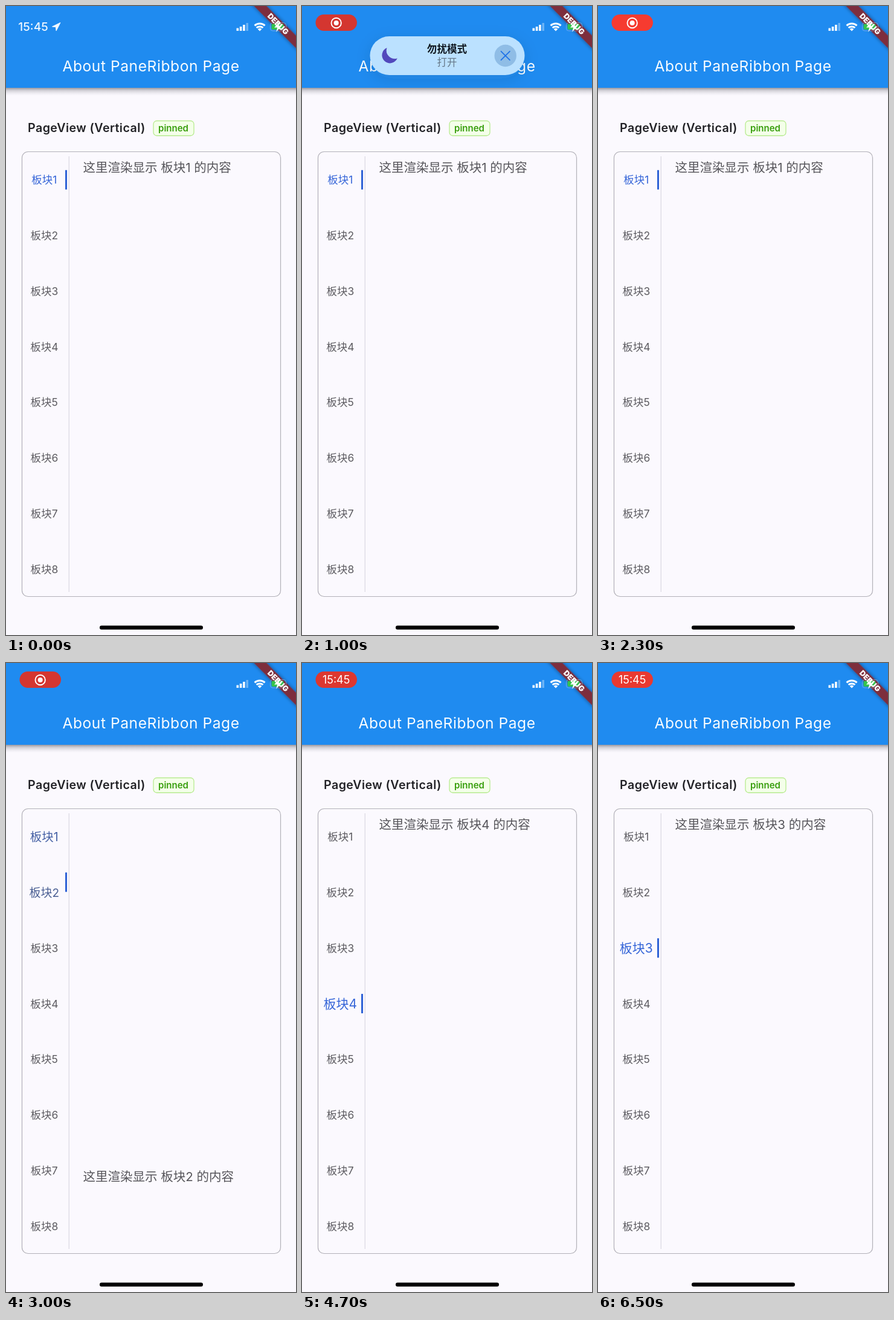
Write an HTML page that moves like this. It is 480 by 1038 pixels and loops after 6.6 s.

```html
<!DOCTYPE html>
<html lang="zh-CN">
<head>
<meta charset="utf-8">
<title>Vertical tabs</title>
<style>
  html, body { margin: 0; width: 100%; height: 100%; overflow: hidden; background: #fbf9fe; }
  svg { display: block; width: 480px; height: 1038px; font-family: Inter, "Noto Sans CJK SC", "Noto Sans CJK", sans-serif; }
  .mid { text-anchor: middle; }
  .tab { font-size: 17.5px; }
  .page { font-size: 20.5px; fill: #56555a; }
</style>
</head>
<body>
<svg viewBox="0 0 480 1038">
  <defs>
    <linearGradient id="fade" x2="0" y2="1">
      <stop stop-color="#6f6e78" stop-opacity=".7"/>
      <stop offset=".35" stop-color="#908f98" stop-opacity=".38"/>
      <stop offset="1" stop-color="#c8c6d0" stop-opacity="0"/>
    </linearGradient>
    <filter id="soft" x="-20%" y="-60%" width="140%" height="260%">
      <feDropShadow dx="0" dy="6" stdDeviation="12" flood-color="#333" flood-opacity=".12"/>
    </filter>
    <filter id="edge" x="-10%" y="-60%" width="120%" height="220%">
      <feDropShadow dx="0" dy="0" stdDeviation="3" flood-opacity=".45"/>
    </filter>
    <clipPath id="view"><rect x="105" y="248" width="349" height="719"/></clipPath>
  </defs>

  <rect width="480" height="1038" fill="#fbf9fe"/>
  <rect y="135" width="480" height="13" fill="url(#fade)"/>
  <rect width="480" height="135" fill="#1f8bf0"/>
  <text class="mid" x="240" y="108" font-size="24.6" letter-spacing=".55" fill="#f8fcff">About PaneRibbon Page</text>

  <text x="36" y="208" font-size="19.7" font-weight="600" letter-spacing=".4" fill="#222226">PageView (Vertical)</text>
  <rect x="244" y="189.5" width="67" height="24.5" rx="5.5" fill="#f4ffe9" stroke="#b7eb8f" stroke-width="1.3"/>
  <text class="mid" x="277" y="206.5" font-size="15" font-weight="600" fill="#389e0d">pinned</text>

  <rect x="26.5" y="240.5" width="428" height="734" rx="10" fill="none" stroke="#b2b1b8" stroke-width="1.2"/>
  <path d="M104.3 248V967" stroke="#dcdae4" stroke-width="1.3"/>
  <g id="tabs"></g>
  <rect id="bar" x="98" width="3" height="32" fill="#2f62d6"/>
  <g clip-path="url(#view)"><g id="pages"></g></g>
  <rect x="155" y="1022.5" width="171" height="6.5" rx="3.2"/>

  <g transform="translate(480 0) rotate(45)">
    <rect x="-60" y="34.5" width="120" height="14.7" fill="#7d2d3e" filter="url(#edge)"/>
  </g>
  <g fill="#f8fcff">
    <path d="M381.5 36.5h3.6v4.5h-3.6zM386.8 34h3.6v7h-3.6zM392.1 31h3.6v10h-3.6z"/>
    <path d="M397.4 28h3.6v13h-3.6z" opacity=".35"/>
    <g fill="none" stroke="#f8fcff" stroke-width="3">
      <path d="M411.5 32.3a12.5 12.5 0 0 1 17 0M414.6 36a8 8 0 0 1 10.8 0"/>
    </g>
    <path d="M416.7 38.2a5 5 0 0 1 6.6 0L420 41.6z"/>
  </g>
  <rect x="437.5" y="27.5" width="26" height="13.5" rx="4" fill="none" stroke="#a8c8e8" stroke-opacity=".55"/>
  <rect x="439.5" y="29.5" width="20" height="9.5" rx="2.3" fill="#34c24e"/>
  <text class="mid" transform="translate(480 0) rotate(45)" y="46.3" font-size="12.5" font-weight="900" fill="#fff">DEBUG</text>
  <path d="M453 25.5l-9 10h5.2l-2.2 7.5 9-10h-5.2z" fill="#fff"/>

  <g id="clock" fill="#f0f8ff">
    <text x="20.3" y="41" font-size="19.2" font-weight="500">15:45</text>
    <path d="M90 27.5L76.5 34l6 .6.6 6.4z" stroke="#f0f8ff" stroke-linejoin="round"/>
  </g>
  <g id="pill">
    <rect id="glow" x="22.5" y="14" width="68.5" height="27" rx="13.5"/>
    <g id="record">
      <circle cx="56.7" cy="28" r="8.2" fill="none" stroke="#fff" stroke-width="1.9"/>
      <circle cx="56.7" cy="28" r="4" fill="#fff"/>
    </g>
    <text id="time" class="mid" x="56.7" y="34" font-size="18" fill="#fff">15:45</text>
  </g>

  <g id="banner">
    <rect x="112.5" width="256" height="64" rx="32" fill="#bbe1ff" filter="url(#soft)"/>
    <path d="M140.5 19a13.2 13.2 0 1 0 17.3 17.2A13.6 13.6 0 0 1 140.5 19z" fill="#5249bc"/>
    <text class="mid" x="240" y="27" font-size="16.6" font-weight="700" fill="#101820">勿扰模式</text>
    <text class="mid" x="240" y="49" font-size="16.6" fill="#667888">打开</text>
    <circle cx="336.7" cy="32" r="18.2" fill="#8fbde6"/>
    <path d="M329.5 24.8l14.4 14.4m0-14.4l-14.4 14.4" stroke="#1f72e8" stroke-width="1.8" stroke-linecap="round"/>
  </g>
</svg>
<script>
const LOOP = 6600, STEP = 100, SLIDE = 300;
const TAB_GAP = 91.75, PAGE_HEIGHT = 719;
const taps = [[2916, 1], [3790, 2], [4350, 3], [5500, 2]];

const $ = id => document.getElementById(id);
const clamp = v => Math.min(1, Math.max(0, v));
const smooth = u => u * u * (3 - 2 * u);
const easeOut = u => Math.sin(u * Math.PI / 2);
const lerp = (a, b, k) => a + (b - a) * k;
const show = (id, on) => $(id).style.display = on ? '' : 'none';

function addText(parent, className, content) {
  const el = document.createElementNS('http://www.w3.org/2000/svg', 'text');
  el.setAttribute('class', className);
  el.textContent = content;
  return parent.appendChild(el);
}
const tabs = [], pages = [];
for (let i = 0; i < 8; i++) {
  tabs.push(addText($('tabs'), 'tab mid', `板块${i + 1}`));
  tabs[i].setAttribute('y', 6.3);
  pages.push(addText($('pages'), 'page', `这里渲染显示 板块${i + 1} 的内容`));
  pages[i].setAttribute('x', 127.5);
}

function drawTabs(t) {
  let from = 0, to = 0, u = 1;
  for (const [start, target] of taps) {
    if (t < start) break;
    from = to;
    to = target;
    u = clamp((t - start) / SLIDE);
  }
  const page = lerp(from, to, smooth(u));
  const swap = easeOut(u);
  const bar = lerp(from, to, easeOut(clamp(u * 2.17))); // settles well before the page
  tabs.forEach((tab, i) => {
    const active = i === to ? (from === to ? 1 : swap) : i === from ? 1 - swap : 0;
    const grow = t < taps[0][0] ? 1 : 1 + 0.2 * active; // the first tab starts unscaled
    tab.setAttribute('transform', `translate(63.3 ${287 + i * TAB_GAP}) scale(${grow})`);
    tab.style.fill = `color-mix(in srgb, #3565d8 ${active * 100}%, #5c5b60)`;
    pages[i].setAttribute('y', 274 + (i - page) * PAGE_HEIGHT);
  });
  $('bar').setAttribute('y', 270.8 + bar * TAB_GAP);
}

function drawStatus(t) {
  const recording = t >= 400;
  show('clock', !recording);
  show('pill', recording);
  show('record', t < 3400);
  show('time', t >= 3400);
  const pulse = 0.5 + 0.5 * Math.cos(t * Math.PI / 1000);
  $('glow').style.fill = `rgb(${lerp(212, 255, pulse)} ${lerp(54, 60, pulse)} 48)`;

  const drop = easeOut(clamp((t - 600) / 400)), lift = smooth(clamp((t - 1579) / SLIDE));
  show('banner', drop > 0 && lift < 1);
  $('banner').setAttribute('transform', `translate(0 ${50 - 130 * (1 - drop) - 130 * lift})`);
}

function frame() {
  const t = Math.floor(performance.now() % LOOP / STEP) * STEP;
  drawTabs(t);
  drawStatus(t);
  requestAnimationFrame(frame);
}
frame();
</script>
</body>
</html>
```
